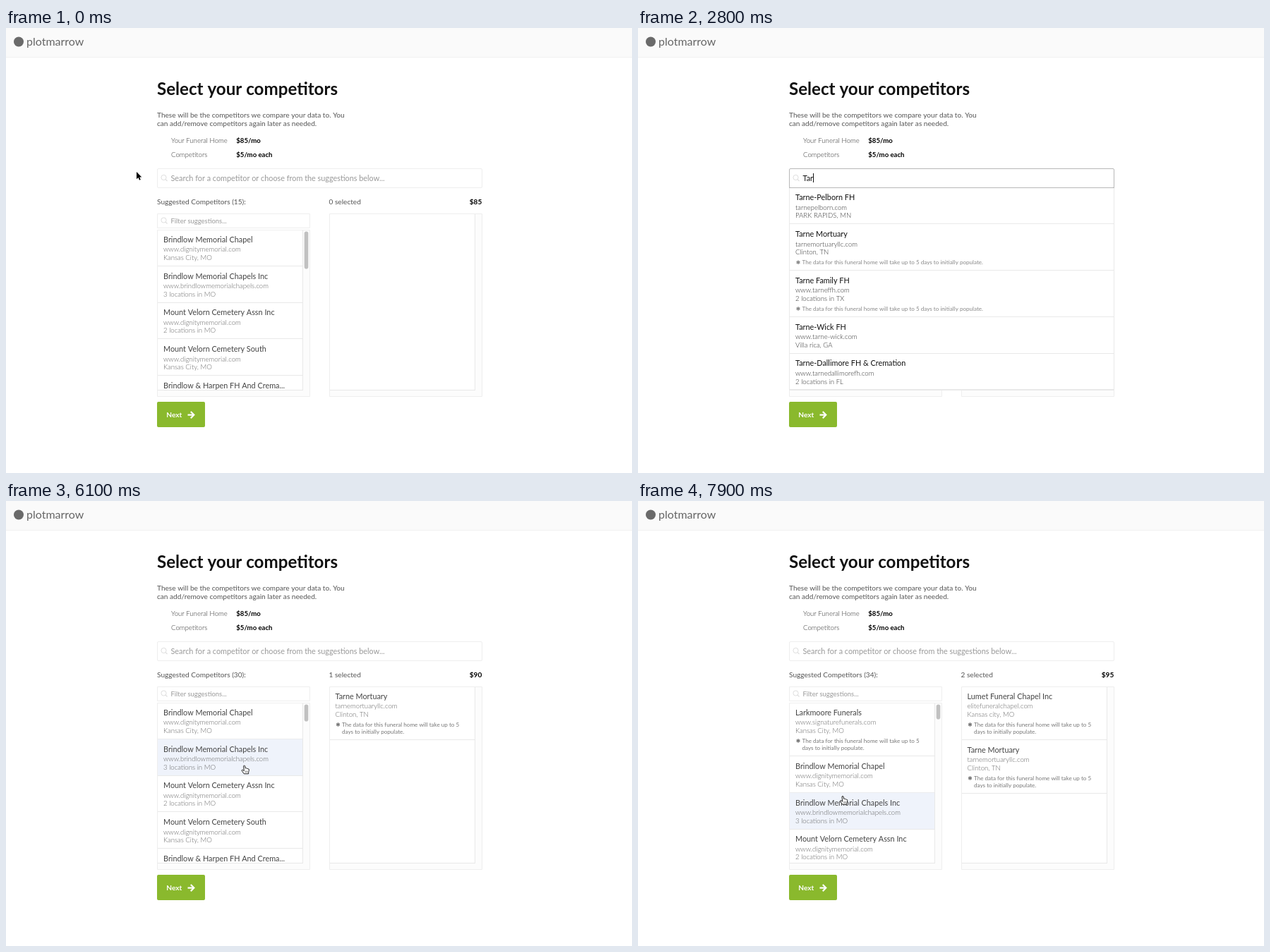
An HTML page with a canvas for the animation above (8 s loop, 887 by 631 pixels).

```html
<!DOCTYPE html>
<html lang="en">
<head>
<meta charset="utf-8">
<title>Select your competitors</title>
<style>
html, body { margin: 0; width: 100%; height: 100%; overflow: hidden; background: #fff; }
canvas { display: block; }
</style>
</head>
<body>
<canvas id="stage" width="887" height="631"></canvas>
<script>
const ctx = document.getElementById('stage').getContext('2d');
const LOOP = 8000, STEP = 100;
const ROW = 51.75, LINE = '#e9e9e9', PALE = '#eeeeee';
const LARGE = 10.85, BODY = 10.12, SMALL = 9.6, NOTE = 8.1;

// name, address, place, whether the data note is shown
const suggestions = [
  ['Brindlow Memorial Chapel', 'www.dignitymemorial.com', 'Kansas City, MO'],
  ['Brindlow Memorial Chapels Inc', 'www.brindlowmemorialchapels.com', '3 locations in MO'],
  ['Mount Velorn Cemetery Assn Inc', 'www.dignitymemorial.com', '2 locations in MO'],
  ['Mount Velorn Cemetery South', 'www.dignitymemorial.com', 'Kansas City, MO'],
  ['Brindlow & Harpen FH And Crema...', 'www.dignitymemorial.com', 'Grandview, MO'],
  ['Lumet FH', 'elitefuneralchapelservice.com', 'Kansas City, MO', true],
  ['Lumet Funeral Chapel Inc', 'elitefuneralchapel.com', 'Kansas city, MO', true],
  ['Harst FH', 'searchguide.level3.com', '8+ locations'],
];
const extra = ['Larkmoore Funerals', 'www.signaturefunerals.com', 'Kansas City, MO', true];
const matches = [
  ['Tarne-Pelborn FH', 'tarnepelborn.com', 'PARK RAPIDS, MN'],
  ['Tarne Mortuary', 'tarnemortuaryllc.com', 'Clinton, TN', true],
  ['Tarne Family FH', 'www.tarneffh.com', '2 locations in TX', true],
  ['Tarne-Wick FH', 'www.tarne-wick.com', 'Villa rica, GA'],
  ['Tarne-Dallimore FH & Cremation', 'www.tarnedallimorefh.com', '2 locations in FL'],
];

const clamp = v => Math.max(0, Math.min(1, v));

// piecewise linear track through [time, value] points
function track(points, t) {
  let [t0, v0] = points[0];
  for (const [t1, v1] of points) {
    if (t < t1) return v0 + (v1 - v0) * clamp((t - t0) / (t1 - t0));
    [t0, v0] = [t1, v1];
  }
  return v0;
}

// text whose capitals are centred on y
function text(str, x, y, size, color, weight = 400, align = 'left') {
  ctx.font = `${weight} ${size}px Lato, sans-serif`;
  ctx.fillStyle = color;
  ctx.textAlign = align;
  ctx.fillText(str, x, y + size * 0.355);
}

function rect(x, y, w, h, color) {
  ctx.fillStyle = color;
  ctx.fillRect(x, y, w, h);
}

function pill(x, y, w, h, r, color) {
  ctx.beginPath();
  ctx.roundRect(x, y, w, h, r);
  ctx.fillStyle = color;
  ctx.fill();
}

function frame(x, y, w, h, color, r = 0) {
  pill(x, y, w, h, r, '#fff');
  ctx.strokeStyle = color;
  ctx.lineWidth = 1;
  ctx.stroke();
}

function stroke(points, color, width) {
  ctx.beginPath();
  points.forEach(([x, y]) => ctx.lineTo(x, y));
  ctx.strokeStyle = color;
  ctx.lineWidth = width;
  ctx.stroke();
}

function clip(x, y, w, h, draw) {
  ctx.save();
  ctx.beginPath();
  ctx.rect(x, y, w, h);
  ctx.clip();
  draw();
  ctx.restore();
}

function lens(x, y) {
  ctx.beginPath();
  ctx.arc(x, y, 3.6, 0, 7);
  ctx.strokeStyle = '#dedede';
  ctx.lineWidth = 1;
  ctx.stroke();
  stroke([[x + 2.6, y + 2.6], [x + 5, y + 5]], '#dedede', 1.2);
}

function star(x, y, color) {
  for (let i = 0; i < 3; i++) {
    const a = Math.PI / 2 + i * Math.PI / 3, dx = 2.8 * Math.cos(a), dy = 2.8 * Math.sin(a);
    stroke([[x - dx, y - dy], [x + dx, y + dy]], color, 1.4);
  }
}

const height = (item, wide) => !item[3] ? ROW : wide ? 65.8 : 76;

function drawItem([name, url, place, note], x, y, wide) {
  const soft = wide ? '#333' : '#666', faint = wide ? '#888' : '#777';
  text(name, x, y + 14, LARGE, wide ? '#111' : '#444');
  text(url, x, y + 28, SMALL, soft, 300);
  text(place, x, y + 39.5, SMALL, soft, 300);
  if (!note) return;
  star(x + 4, y + 54, faint);
  const lines = wide
    ? ['The data for this funeral home will take up to 5 days to initially populate.']
    : ['The data for this funeral home will take up to 5', 'days to initially populate.'];
  lines.forEach((line, i) => text(line, x + 9.5, y + 54 + 10.3 * i, NOTE, faint));
}

function drawList(items, left, top, width, wide, pointerY) {
  let y = top;
  for (const item of items) {
    const h = height(item, wide);
    if (pointerY >= y && pointerY < y + h) rect(left, y, width, h, '#eff3fb');
    drawItem(item, left + 8.5, y, wide);
    rect(left, Math.round(y + h) - 1, width, 1, LINE);
    y += h;
  }
}

// box with empty scroll tracks along its right and bottom edges
function scrollBox(x, y, w, h) {
  frame(x + .5, y + .5, w - 1, h - 1, PALE);
  rect(x + w - 10, y + 1, 9, h - 2, '#fcfcfc');
  rect(x + 1, y + h - 10, w - 2, 9, '#fcfcfc');
  rect(x + w - 11, y + 1, 1, h - 11, '#e8e8e8');
  rect(x + 1, y + h - 10, w - 11, 1, '#e8e8e8');
}

function drawPage() {
  rect(0, 0, 887, 631, '#fff');
  rect(0, 0, 887, 41, '#fafafa');
  rect(0, 41, 887, 1, '#f1f1f1');
  pill(11, 12.5, 14, 14, 7, '#6a6a6a');
  text('plotmarrow', 29, 19.5, 16, '#666');

  text('Select your competitors', 214, 86.5, 24.15, '#111', 700);
  text('These will be the competitors we compare your data to. You', 214, 123.5, BODY, '#555');
  text('can add/remove competitors again later as needed.', 214, 135.5, BODY, '#555');
  text('Your Funeral Home', 234, 160, SMALL, '#333', 300);
  text('Competitors', 234, 179.5, SMALL, '#333', 300);
  text('$85/mo', 326.3, 160, SMALL, '#000', 700);
  text('$5/mo each', 326.3, 179.5, SMALL, '#000', 700);

  pill(214, 530, 68, 36, 2, '#8ab92d');
  text('Next', 227.3, 548.7, BODY, '#fff', 700);
  stroke([[257.5, 548.6], [266, 548.6]], '#fff', 2.2);
  stroke([[261.8, 544], [266.3, 548.6], [261.8, 553.2]], '#fff', 2.2);
}

function drawSearch(t) {
  const focus = track([[500, 0], [800, 1], [5100, 1], [5200, .7], [5300, 0]], t);
  const shade = 238 - 54 * focus;
  frame(214.5, 199.5, 460, 27, `rgb(${shade},${shade},${shade})`, 1.5);
  lens(223.5, 212);
  const keys = [2300, 2500, 2600, 3000, 3100];
  const typed = t < 5200 ? 'Tarne'.slice(0, keys.filter(k => t >= k).length) : '';
  if (typed) text(typed, 233.5, 213, LARGE, '#111');
  else text('Search for a competitor or choose from the suggestions below...', 233.5, 213, LARGE, '#999');
  const spans = [[700, 1200], [1700, 2100], [2300, 3500], [4000, 4500], [5000, 5200]];
  if (spans.some(([a, b]) => t >= a && t < b)) {
    const x = typed ? 233.5 + ctx.measureText(typed).width : 233.5;
    rect(Math.round(x), 206, 1, 13, '#111');
  }
}

function drawPointer(x, y, kind) {
  ctx.save();
  ctx.translate(x, y);
  if (kind === 'arrow') {
    const p = new Path2D('M0 0V10.2L2.4 8L4 11.8L5.8 11L4.2 7.4H7.3Z');
    ctx.strokeStyle = '#fff';
    ctx.lineWidth = 1.4;
    ctx.stroke(p);
    ctx.fillStyle = '#000';
    ctx.fill(p);
  } else if (kind === 'beam') {
    const p = new Path2D('M-2.3 -5.3Q0 -5.3 0 -4Q0 -5.3 2.3 -5.3M0 -4V4.5M-2.3 5.8Q0 5.8 0 4.5Q0 5.8 2.3 5.8M-1.3 2.2H1.3');
    ctx.strokeStyle = '#fff';
    ctx.lineWidth = 2.2;
    ctx.stroke(p);
    ctx.strokeStyle = '#111';
    ctx.lineWidth = 1;
    ctx.stroke(p);
  } else {
    const p = new Path2D('M-1 0Q0 -1 1 0L1.7 3.4Q3 2.6 3.6 3.8Q5 3.2 5.4 4.4Q6.8 4 6.8 5.6L6 9.2V11.2H-.4L-3.6 6.6Q-3.6 5.2 -2 5.8L-.3 7.2Z');
    ctx.fillStyle = '#fff';
    ctx.fill(p);
    ctx.strokeStyle = '#222';
    ctx.lineWidth = 1;
    ctx.stroke(p);
    stroke([[2, 7], [2, 9.6]], '#333', .7);
    stroke([[4, 7], [4, 9.6]], '#333', .7);
  }
  ctx.restore();
}

function draw(t) {
  const added = t >= 7800 ? 2 : t >= 5200 ? 1 : 0;
  const x = track([[300, 185], [800, 268], [3600, 268], [4500, 276], [5700, 276], [6200, 353], [7100, 353], [7600, 290]], t);
  const y = track([[300, 204], [800, 216], [3600, 216], [4500, 310], [5700, 310], [6200, 392], [7100, 392], [7600, 419]], t);
  const scroll = added > 1 ? 0 : track([[6200, 0], [6400, 115.7], [6600, 175], [6700, 175], [6800, 196], [7000, 231.4]], t);
  // the highlight only catches up once scrolling settles
  const settled = added > 1 || t < 6600 ? 0 : t < 7100 ? 175 : 231.4;
  const hoverY = t >= 5300 ? y + settled - scroll : -1;

  drawPage();
  drawSearch(t);

  text(`Suggested Competitors (${[15, 30, 34][added]}):`, 214, 246.5, BODY, '#555');
  text(`${added} selected`, 457.5, 246.5, BODY, '#555');
  text('$' + (85 + 5 * added), 674.3, 246.5, BODY, '#000', 700, 'right');

  frame(214.5, 263.5, 216, 20, PALE);
  lens(223.5, 272.5);
  text('Filter suggestions...', 233.5, 273.5, 9.45, '#999');
  scrollBox(214, 286, 217, 237);
  const items = added > 1 ? [extra, ...suggestions] : suggestions;
  clip(215, 287, 205, 226, () => drawList(items, 214.5, 286 - scroll, 206, false, hoverY));
  pill(422.7, 288.5 + scroll * .1245, 5.6, [53, 24, 21][added], 2.8, '#c1c1c1');

  scrollBox(458, 263, 217, 260);
  const chosen = [suggestions[6], matches[1]].slice(2 - added);
  clip(459, 264, 205, 249, () => drawList(chosen, 458, 263, 206, false, -1));

  if (t >= 2700 && t < 5200) {
    frame(214.5, 226.5, 460, 287, LINE);
    drawList(matches, 214.5, 226.5, 460, true, -1);
    rect(214, 226, 461, 1, '#b8b8b8');
  }

  const typing = t >= 2300 && t < 3700;
  if (!typing) drawPointer(x, y, t < 600 ? 'arrow' : t < 5300 ? 'beam' : 'hand');
}

function tick(now) {
  draw(Math.floor(now % LOOP / STEP) * STEP);
  requestAnimationFrame(tick);
}
requestAnimationFrame(tick);
</script>
</body>
</html>
```
